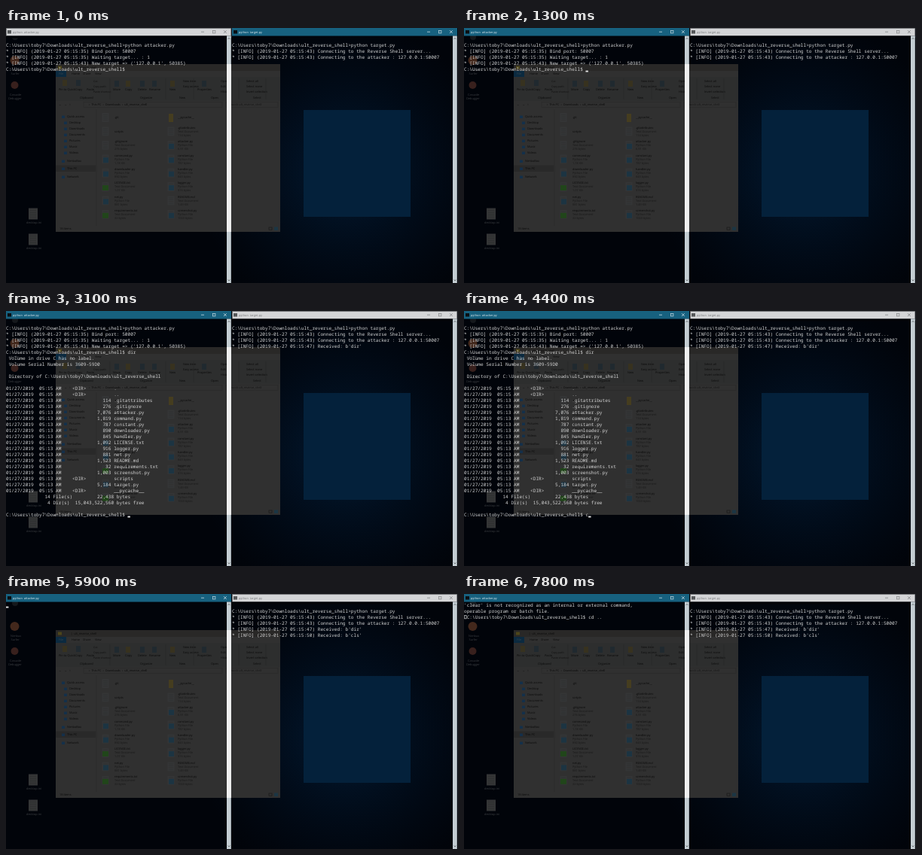
Write an HTML page with a canvas that moves like this. It is 600 by 339 pixels and loops after 8000 ms.

```html
<!DOCTYPE html>
<html lang="en">
<head>
<meta charset="utf-8">
<title>Two terminals</title>
<style>
html, body { margin: 0; height: 100%; overflow: hidden; background: #000; }
canvas { display: block; }
</style>
</head>
<body>
<canvas id="stage" width="600" height="339"></canvas>
<script>
const LOOP = 8000, CELL = 3.67, ROW = 8;
const MONO = '"Noto Sans Mono", monospace', SANS = '"Open Sans", sans-serif';
const stage = document.getElementById('stage');
let g = stage.getContext('2d');

function rect(x, y, w, h, color) {
  g.fillStyle = color;
  g.fillRect(x, y, w, h);
}

function frame(x, y, w, h, color, width = 0.6) {
  g.strokeStyle = color;
  g.lineWidth = width;
  g.strokeRect(x, y, w, h);
}

function disc(x, y, r, color) {
  g.fillStyle = color;
  g.beginPath();
  g.arc(x, y, r, 0, 7);
  g.fill();
}

function line(color, width, ...p) {
  g.strokeStyle = color;
  g.lineWidth = width;
  g.beginPath();
  for (let i = 0; i < p.length; i += 2) g.lineTo(p[i], p[i + 1]);
  g.stroke();
}

// A large font scaled down keeps fractional letter widths.
function text(s, x, y, size, color, font = SANS) {
  g.save();
  g.translate(x, y);
  g.scale(size / 100, size / 100);
  g.font = '100px ' + font;
  g.textRendering = 'geometricPrecision';
  g.fillStyle = color;
  g.fillText(s, 0, 0);
  g.restore();
}

const label = (s, x, y, color = '#0b0b0b', size = 3.9) => text(s, x, y + 1.4, size, color);

function glow(x, y, r, color) {
  const grad = g.createRadialGradient(x, y, 0, x, y, r);
  grad.addColorStop(0, color);
  grad.addColorStop(1, 'rgba(0,20,45,0)');
  rect(0, 0, 600, 339, grad);
}

function drawPage(x, y, w, h) {
  rect(x - w / 2, y - h / 2, w, h, '#343536');
  for (let i = 1; i < 5; i++)
    line('#2b2c2d', 0.5, x - w / 3, y - h / 2 + i * h / 5, x + w / 3, y - h / 2 + i * h / 5);
}

function drawWallpaper() {
  rect(0, 0, 600, 339, '#01040a');
  glow(450, 190, 200, 'rgba(4,38,72,.65)');
  rect(395, 109, 142, 142, '#04213b');

  disc(11.5, 43, 6, '#43281c');
  disc(11.5, 76, 5, '#38201d');
  [['Nimbus', 6, 56], ['Surfer', 6.5, 61], ['Cascade', 5, 89], ['Debugger', 3, 94]]
    .forEach(([s, x, y]) => label(s, x, y, '#3c3e42'));
  disc(12, 12, 4, '#15181c');
  for (const y of [248, 282]) {
    drawPage(36, y - 1, 12, 15);
    label('desktop.ini', 27, y + 11, '#3c3e42');
  }
}

function drawRibbon() {
  rect(66, 48, 298, 9, '#292827');
  rect(69, 50.5, 5, 4, '#4d451a');
  label('|  ult_reverse_shell', 86, 53);
  rect(66, 57, 298, 8, '#303030');
  rect(66, 57, 14, 8, '#0b2a40');
  label('File', 70, 61, '#39434b');
  label('Home', 87, 61);
  label('Share', 102, 61);
  label('View', 118, 61);
  rect(66, 65, 298, 32, '#2d2e2e');

  [[78, 73], [96, 73], [147, 74], [162, 74], [181, 74], [197, 74], [221, 74], [263, 74]]
    .forEach(([x, y], i) => rect(x - 3, y - 4, 6, 8, i % 3 ? '#20292f' : '#37321f'));
  ['Pin to Quick', 'Copy', 'Paste'].forEach((s, i) => label(s, [70, 92, 107][i], 82));
  ['Move', 'Copy', 'Delete', 'Rename'].forEach((s, i) => label(s, [142, 158, 175, 190][i], 82));
  label('New', 217, 82);
  label('Properties', 254, 82);
  ['Cut', 'Copy path', 'Paste shortcut'].forEach((s, i) => label(s, 116, 71 + 7 * i, '#101010', 3.5));
  ['New item', 'Easy access'].forEach((s, i) => label(s, 235, 71 + 7 * i));
  ['Open', 'Edit', 'History'].forEach((s, i) => label(s, 285, 71 + 7 * i));
  ['Select all', 'Select none', 'Invert selection'].forEach((s, i) => label(s, 319, 71 + 7 * i));
  ['Clipboard', 'Organize', 'New', 'Open', 'Select']
    .forEach((s, i) => label(s, [98, 178, 230, 272, 328][i], 93));
  for (const x of [138, 212, 249, 309, 345]) line('#262626', 0.6, x, 67, x, 95);
}

function drawFiles() {
  const names = [
    '.git', '__pycache__', 'scripts', '.gitattributes', '.gitignore', 'attacker.py',
    'command.py', 'constant.py', 'downloader.py', 'handler.py', 'LICENSE.txt', 'logger.py',
    'net.py', 'README.md', 'requirements.txt', 'screenshot.py'];
  const sizes = [0, 0, 0, 114, 276, 7076, 1819, 787, 890, 845, 1092, 916, 881, 1523, 32, 1003];
  names.forEach((name, i) => {
    const x = i % 2 ? 219 : 132, y = 119 + (i >> 1) * 18.4;
    const tx = x + (i % 2 ? 9 : 12);
    const python = /py$/.test(name);
    if (name == '__pycache__') rect(x - 3, y - 5, 6, 11, '#453d1f');
    else drawPage(x, y, 9, 12);
    if (python) rect(x - 3, y - 2, 7, 7, '#1c3442');
    if (/txt$/.test(name)) rect(x - 4, y - 2, 8, 7, '#21451a');
    if (!sizes[i]) return label(name, tx, y);
    label(name, tx, y - 5);
    label(python ? 'Python File' : 'Text Document', tx, y, '#1a1a1a');
    label(sizes[i] < 1024 ? sizes[i] + ' bytes' : (sizes[i] / 1024).toFixed(2) + ' KB', tx, y + 5, '#1a1a1a');
  });
}

function drawExplorer() {
  rect(66, 48, 298, 223, '#303030');
  drawRibbon();
  label('←   →   ↑', 70, 102);
  frame(103, 98.5, 184, 7, '#282828');
  label('›  This PC  ›  Downloads  ›  ult_reverse_shell', 110, 102);
  frame(292, 98.5, 69, 7, '#282828');
  label('Search ult_reverse_shell', 296, 102, '#181818');

  rect(66, 182.5, 53, 8.5, '#292929');
  ['Quick access', 'Desktop', 'Downloads', 'Documents', 'Pictures', 'Music', 'Videos',
    'NimboBox', 'This PC', 'Network'].forEach((s, i) => {
    const y = [118, 126, 134, 142, 150, 158, 166, 177, 187, 198][i];
    const x = i && i < 7 ? 77 : 74;
    rect(x, y - 1.5, 4, 3.5, '#14304a');
    label(s, x + 7, y);
  });
  line('#2a2a2a', 0.6, 120, 108, 120, 263);
  drawFiles();
  label('18 items', 71, 267);
  frame(349, 265, 4, 3.5, '#161616');
  rect(356, 264.5, 5, 4.5, '#1c3644');
}

function makeDesktop() {
  const c = document.createElement('canvas'), main = g;
  c.width = 600;
  c.height = 339;
  g = c.getContext('2d');
  drawWallpaper();
  drawExplorer();
  g = main;
  return c;
}

function drawWindow(x, title, active) {
  const ink = active ? '#e4eef2' : '#77797b';
  rect(x, 0, 299, 10.5, active ? '#17617f' : '#d4d5d7');
  if (!active) frame(x + 0.4, 0.4, 298.4, 12, '#606264', 0.8);
  if (!active) rect(x, 10.5, 293, 3, '#020306');
  rect(x + 2, 3, 5, 4.5, active ? '#0a1014' : '#56585a');
  text(title, x + 9, 6.6, 3.9, ink);
  line(ink, 0.7, x + 259, 5.2, x + 263, 5.2);
  frame(x + 274.3, 3.3, 3.6, 3.6, ink);
  line(ink, 0.7, x + 289, 3.2, x + 292.7, 7);
  line(ink, 0.7, x + 292.7, 3.2, x + 289, 7);

  rect(x + 293, 10.5, 5.8, 328.5, '#c4ced3');
  if (!x) rect(293, 48, 5.8, 223, '#f0f0f0');
  line('#55585b', 0.8, x + 294.6, 14.8, x + 296, 13.3, x + 297.4, 14.8);
  line('#55585b', 0.8, x + 294.6, 334.5, x + 296, 336, x + 297.4, 334.5);
}

const print = (lines, x) => lines.forEach((s, r) =>
  text(s, x, 16.7 + r * ROW, CELL / 0.6, '#d2d2d2', MONO));

const HOME = 'C:\\Users\\toby7\\Downloads\\ult_reverse_shell';
const PROMPT = HOME + '$ ';
const info = (time, s) => `* [INFO] (2019-01-27 05:15:${time}) ${s}`;
const INTRO = ['', HOME + '>python attacker.py', info(35, 'Bind port: 50007'),
  info(35, 'Waiting target... : 1'), info(43, "New target => ('127.0.0.1', 50385)")];
const ENTRIES = `. .. .gitattributes:114 .gitignore:276 attacker.py:7,076 command.py:1,819
  constant.py:787 downloader.py:890 handler.py:845 LICENSE.txt:1,092 logger.py:916 net.py:881
  README.md:1,523 requirements.txt:32 screenshot.py:1,003 scripts target.py:5,184 __pycache__`;
const LISTING = [' Volume in drive C has no label.', ' Volume Serial Number is 3609-59D0', '',
  ' Directory of ' + HOME, '',
  ...ENTRIES.split(/\s+/).map(entry => {
    const [name, size] = entry.split(':');
    const minute = /^\.+$|^__/.test(name) ? 15 : 13;
    return `01/27/2019  05:${minute} AM ` + (size ? size.padStart(17) : '   <DIR>'.padEnd(17)) + ' ' + name;
  }),
  '14 File(s)'.padStart(24) + '22,438 bytes'.padStart(21),
  '4 Dir(s)  15,043,522,560 bytes free'.padStart(50), ''];
const ERROR = ["'clear' is not recognized as an internal or external command,",
  'operable program or batch file.'];

// Part of a word typed so far, one time per letter.
const typed = (word, times, t) => word.slice(0, times.filter(at => t >= at).length);

function attackerLines(t) {
  if (t >= 6700) return [...ERROR, ' ' + PROMPT + typed('cd ..', [6700, 6900, 7100, 7500, 7600], t)];
  if (t >= 6100) return [...ERROR, ''];
  if (t >= 5900) return [''];
  const lines = [...INTRO, PROMPT + typed('dir', [2200, 2300, 2400], t)];
  if (t >= 2900) lines.push(...LISTING, PROMPT + typed('cls', [4400, 4600, 4700], t));
  if (t >= 2600 && t < 2900 || t >= 4800) lines.push('');
  return lines;
}

function targetLines(t) {
  const lines = ['', HOME + '>python target.py', info(43, 'Connecting to the Reverse Shell server...'),
    info(43, 'Connecting to the attacker : 127.0.0.1:50007')];
  if (t >= 2600) lines.push(info(47, "Received: b'dir'"));
  if (t >= 4800) lines.push(info(50, "Received: b'cls'"));
  return lines;
}

const CURSOR_ON = [[1200, 1700], [2200, 3500], [4000, 5500], [5900, 7800]];
const desktop = makeDesktop();

function draw(t) {
  g.drawImage(desktop, 0, 0);
  const leftActive = t >= 400;
  drawWindow(0, 'python  attacker.py', leftActive);
  drawWindow(300, 'python  target.py', !leftActive);

  const lines = attackerLines(t), last = lines.length - 1;
  print(lines, 0);
  print(targetLines(t), 300);
  if (t >= 6700) frame(0.7, 28.4, 2.4, 4.4, '#d2d2d2', 0.7);
  if (CURSOR_ON.some(([from, to]) => t >= from && t < to))
    rect(lines[last].length * CELL, 16.6 + last * ROW, 3.4, 1.9, '#e6e6e6');
}

const start = performance.now();
function tick() {
  draw((performance.now() - start) % LOOP);
  requestAnimationFrame(tick);
}
tick();
</script>
</body>
</html>
```
